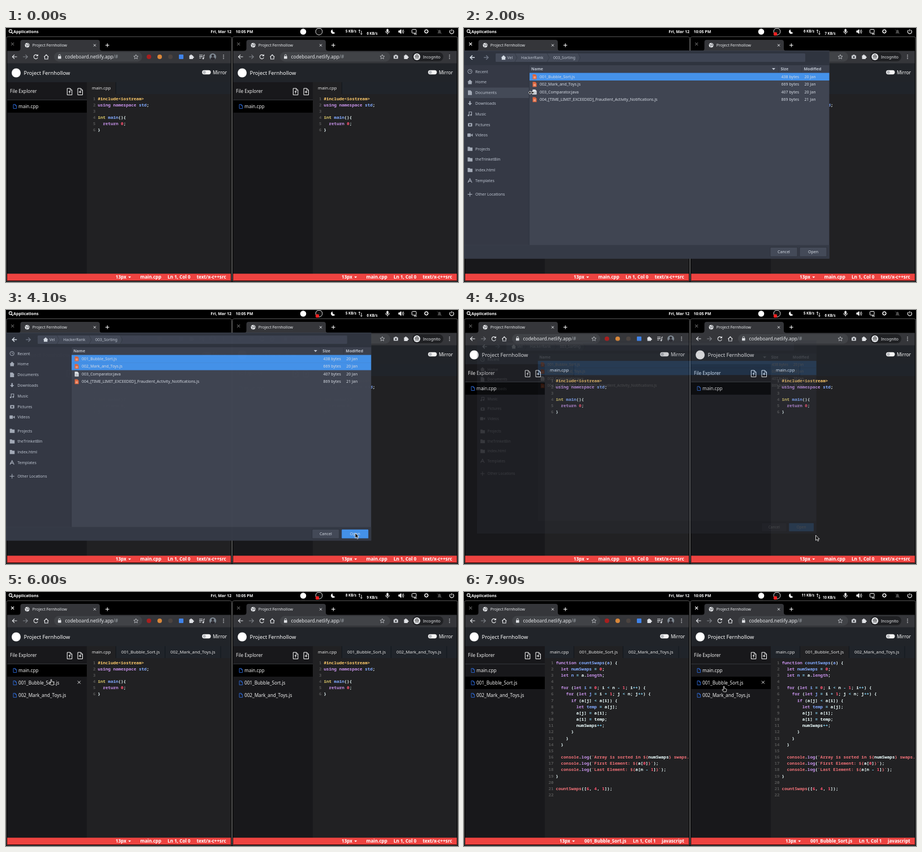
Recreate the animation shown at these times as an HTML page. Size 800x450 px, loop 8000 ms.

```html
<!DOCTYPE html>
<html lang="en">
<head>
<meta charset="utf-8">
<title>Shared code editor</title>
<style>
html, body { margin: 0; width: 100%; height: 100%; overflow: hidden; background: #000; }
svg { display: block; width: 100vw; height: 100vh; }
text { font-family: "Noto Sans", "Open Sans", sans-serif; white-space: pre; }
.b { font-weight: 700; }
.code text { font: 700 7.59px "Noto Sans Mono", "DejaVu Sans Mono", monospace; }
</style>
</head>
<body>
<svg id="stage" viewBox="0 0 800 450" preserveAspectRatio="none"></svg>
<script>
const LOOP = 8000;
const APP = "Project Fernhollow";
const FILES = ["main.cpp", "001_Bubble_Sort.js", "002_Mark_and_Toys.js"];
const BLUE = "#4592ea";

const esc = s => s.replace(/&/g, "&amp;").replace(/</g, "&lt;");
const T = (x, y, size, s, fill = "#fff", extra = "") =>
  `<text x="${x}" y="${y}" font-size="${size}" fill="${fill}" ${extra}>${esc(s)}</text>`;
const R = (x, y, w, h, fill, extra = "") =>
  `<rect x="${x}" y="${y}" width="${w}" height="${h}" fill="${fill}" ${extra}/>`;
const C = (x, y, r, fill, extra = "") => `<circle cx="${x}" cy="${y}" r="${r}" fill="${fill}" ${extra}/>`;
const L = (d, stroke = "#fff", w = 1, extra = "") =>
  `<path d="${d}" stroke="${stroke}" stroke-width="${w}" fill="none" ${extra}/>`;
const G = (id, body, extra = "") => `<g id="${id}" ${extra}>${body}</g>`;
const cross = (x, y, r) => `M${x - r} ${y - r}l${2 * r} ${2 * r}M${x + r} ${y - r}l${-2 * r} ${2 * r}`;
const BOLD = 'class="b"';

// Source code: ~ wraps a token, its first letter picks the colour.
const INK = { k: "#c792ea", d: "#82aaff", m: "#ffcb6b", t: "#decb6b", n: "#ff5370",
  v: "#f07178", s: "#f07178", p: "#c792ea", o: "#89ddff" };
const CPP = [
  "~m#include<iostream>~", "~kusing~ ~knamespace~ ~dstd~;", "",
  "~tint~ ~dmain~(){", "  ~kreturn~ ~n0~;", "}"
];
const JS = [
  "~kfunction~ ~dcountSwaps~(~da~) {",
  "  ~klet~ ~dnumSwaps~ ~o=~ ~n0~;",
  "  ~klet~ ~dn~ ~o=~ a.~plength~;",
  "",
  "  ~kfor~ (~klet~ ~di~ ~o=~ ~n0~; i ~o<~ n ~o-~ ~n1~; i~o++~) {",
  "    ~kfor~ (~klet~ ~dj~ ~o=~ i ~o+~ ~n1~; j ~o<~ n; j~o++~) {",
  "      ~kif~ (a[j] ~o<~ a[i]) {",
  "        ~klet~ ~dtemp~ ~o=~ a[j];",
  "        a[j] ~o=~ a[i];",
  "        a[i] ~o=~ temp;",
  "        numSwaps~o++~;",
  "      }", "    }", "  }", "",
  "  ~vconsole~.~plog~(~s`Array is sorted in ${~numSwaps~s} swaps.`~);",
  "  ~vconsole~.~plog~(~s`First Element: ${~a[~n0~]~s}`~);",
  "  ~vconsole~.~plog~(~s`Last Element: ${~a[n ~o-~ ~n1~]~s}`~);",
  "}", "",
  "~vcountSwaps~([~n6~, ~n4~, ~n1~]);", ""
];

function codeView(lines) {
  return lines.map((line, i) => {
    const y = 127.6 + i * 11.17;
    const spans = line.split("~").map((s, k) => k % 2
      ? `<tspan fill="${INK[s[0]]}">${esc(s.slice(1))}</tspan>` : esc(s)).join("");
    return `<text x="158.6" y="${y}" text-anchor="end" fill="#545454">${i + 1}</text>` +
      `<text x="162.4" y="${y}" fill="#eeffff">${spans}</text>`;
  }).join("");
}

const docIcon = (x, y) => L(`M${x} ${y}h5.5l3 3v8.5h-8.5z`) + L(`M${x + 5.3} ${y}v3.2h3.2`, "#fff", .8);
const fileIcon = y => L(`M13 ${y - 3.6}h3.4l2.2 2.2v5h-5.6z`, "#2f6fe0", .9) + L(`M16.2 ${y - 3.6}v2.4h2.4`, "#2f6fe0", .8);

const status = (x, file, col, mode) =>
  T(x[0], 444.4, 8.1, "13px", "#fff", BOLD) +
  `<path d="M${x[0] + 22.3} 440.2h5l-2.5 2.8z" fill="#fff"/>` +
  T(x[1], 444.4, 8.1, file, "#fff", BOLD) +
  T(x[2], 444.4, 8.1, "Ln 1, Col " + col, "#fff", BOLD) +
  T(x[3], 444.4, 8.1, mode, "#fff", BOLD);

const tab = (x, w, s, tx) =>
  T(tx, 109, 7.7, s, "#e6e6e6") + L(`M${x + w} 96v21`, "#11161c");

const puzzle = x =>
  R(x - 3.5, 48.5, 6.5, 6.5, "#dfe1e5", 'rx=".8"') + C(x - .4, 48.4, 1.5, "#dfe1e5") + C(x + 3.2, 51.8, 1.5, "#dfe1e5");
const dots = x => [-3, 0, 3].map(d => C(x, 51 + d, .85, "#dfe1e5")).join("");
const star = x => {
  let d = "";
  for (let i = 0; i < 10; i++) {
    const a = i * Math.PI / 5 - Math.PI / 2, r = i % 2 ? 1.9 : 4.2;
    d += (i ? "L" : "M") + (x + r * Math.cos(a)).toFixed(2) + " " + (51.3 + r * Math.sin(a)).toFixed(2);
  }
  return L(d + "z", "#c8cbd0", .8);
};

const leftTools = star(230) + C(253, 51, 4, "#a81e1e") + C(272, 51, 4, "#d9873a") +
  C(291, 51, 4, "#4b4340") + R(306, 47, 8, 8, "#3f83ea", 'rx="1"') + puzzle(328) +
  L("M342 48h6M342 50.6h6M342 53.2h3.5M350 48v5.5M350 48h2", "#dfe1e5", 1.1) + C(349, 54, 1.4, "#dfe1e5") +
  C(366, 51, 6, "#7d8791") + C(366, 49.3, 2.2, "#2b2a30") + `<path d="M362 55.5q0-4 4-4t4 4q-4 3-8 0" fill="#2b2a30"/>` +
  dots(385);
const rightTools = star(266) + R(286, 48.5, 8, 6, "#c9ccd1", 'rx="1"') + R(288.3, 47.3, 3.4, 2, "#c9ccd1") +
  C(290, 51.5, 1.5, "#35363a") + puzzle(308) + R(319, 43, 55, 16, "#202124", 'rx="8"') +
  C(327.3, 51, 6, "#e8eaed") + L("M323.5 50.2h7.6M325.3 49.6l.6-2h2.8l.6 2", "#333") +
  C(325.7, 52.8, 1.2, "none", 'stroke="#333" stroke-width=".7"') + C(329, 52.8, 1.2, "none", 'stroke="#333" stroke-width=".7"') +
  T(338, 53.5, 6.87, "Incognito", "#e8eaed") + dots(385);

function browser(id, ox, tools, pillEnd) {
  const chrome =
    R(.5, 15.5, 399, 434, "#000", 'rx="3" stroke="#555" stroke-width="1"') +
    `<path d="M2 63V40.5H21q4.5 0 4.5-4V25q0-4 4-4H162q4 0 4 4v11.5q0 4 4.5 4H398V63z" fill="#35363a"/>` +
    L(cross(11.6, 28.4, 2.5), "#fff", 1.2, `id="${id}x"`) +
    C(37.5, 30.5, 4, "#e8eaed") + L("M34.6 29l2.4 1.3v2l-1 1.3M38 27.2l1.7 1.5-1 1.8 2 1", "#35363a", .9) +
    T(46.8, 33, 7, APP, "#e8eaed") + L(cross(157, 30.6, 2), "#e8eaed") +
    L("M176 30.5h6.6M179.3 27.2v6.6", "#fff", 1.1) +
    L("M19.5 51h-8M15 47.3l-3.7 3.7 3.7 3.7", "#e8eaed", 1.1) +
    L("M30 51h8M34.5 47.3l3.7 3.7-3.7 3.7", "#80848a", 1.1) +
    L("M55.8 49a3.6 3.6 0 1 0 .4 3.2M56.3 46.8v2.7h-2.7", "#e8eaed", 1.1) +
    L("M67.3 51.3l4-4 4 4M68.5 50.3v4.7h5.6v-4.7", "#e8eaed", 1.1) +
    R(85, 42.5, pillEnd - 85, 17, "#414347", 'rx="8.5"') +
    R(92, 50, 5.6, 4.6, "#dfe1e5", 'rx=".6"') + L("M93.2 50v-1.4a1.6 1.6 0 0 1 3.2 0v1.4", "#dfe1e5", .9) +
    `<text x="104.4" y="54" font-size="8.36" fill="#e8eaed">codeboard.netlify.app<tspan fill="#9aa0a6">/#</tspan></text>` + tools;

  const page =
    R(2, 62.5, 396, 34, "#212429") + R(2, 96, 141, 340, "#18181b") + R(143, 96, 255, 21, "#20242a") +
    R(143, 117, 255, 319, "#212123") +
    C(18, 79.5, 8, "#fff") + T(31.5, 83, 9.35, APP) +
    R(347, 74.8, 15.5, 7.4, "#f4f4f4", 'rx="3.7"') + C(351, 78.5, 2.7, "#b9bcc0") + T(366, 81.5, 8.33, "Mirror") +
    T(7, 115, 8.2, "File Explorer", "#f0f0f0") +
    docIcon(108.3, 107) + L("M112.6 116v-4.3M110.7 113.3l1.9-1.9 1.9 1.9") +
    docIcon(127, 107) + L("M131.2 111v4.6M128.9 113.3h4.6") +
    L("M2 127.5h141", "#3b3f44", .8) +
    R(2, 128, 141, 22, "#000", `id="${id}row"`) +
    R(143, 96, 51.5, 21, "#212123", `id="${id}tab"`) +
    fileIcon(139) + T(22, 142, 8.2, FILES[0], "#f0f0f0") + tab(143, 51.5, FILES[0], 152) +
    G(id + "files",
      fileIcon(161) + T(22, 163.6, 8.2, FILES[1], "#f0f0f0") + fileIcon(183) + T(22, 185.6, 8.2, FILES[2], "#f0f0f0") +
      tab(195, 86.5, FILES[1], 204) + tab(282, 98, FILES[2], 291)) +
    L(cross(129.4, 160, 2.5), "#fff", .9, `id="${id}del"`) +
    G(id + "cpp", codeView(CPP), 'class="code"') + G(id + "js", codeView(JS), 'class="code" clip-path="url(#pane)"') +
    R(2, 435.3, 396, 12.3, "#ee4340") +
    G(id + "scpp", status([194, 237.5, 286, 337.5], FILES[0], 0, "text/x-c++src")) +
    G(id + "sjs", status([169, 213, 299, 350], FILES[1], 1, "javascript"));

  return `<g transform="translate(${ox} 0)">${chrome}${page}</g>`;
}

function topBar() {
  const rays = [0, 45, 90, 135].map(a => `<path d="M740 6h8" stroke="#fff" stroke-width="1.1" transform="rotate(${a} 744 6)"/>`).join("");
  return C(8, 5.5, 2.6, "none", 'stroke="#fff" stroke-width="1.1"') + L("M9.9 7.5l2.5 2.7", "#fff", 1.3) +
    T(13, 8.7, 7.2, "Applications", "#fff", BOLD) +
    T(362.3, 8.7, 7, "Fri, Mar 12", "#fff", BOLD) + T(406.5, 8.7, 7, "10:05 PM", "#fff", BOLD) +
    C(526, 6.5, 5.3, "#fff") + C(554, 6.3, 6, "#111", 'stroke="#ddd" stroke-width="1"') +
    R(548, 7.5, 6, 6, "#f02020", 'id="rec" rx="1.5"') +
    `<path d="M578 2.5a4 4 0 1 0 4.5 5.8a4.5 4.5 0 0 1-4.5-5.8z" fill="#fff"/>` +
    T(620, 8, 6.2, "", "#fff", 'id="up" class="b" text-anchor="end"') +
    T(657.5, 11.8, 6.2, "", "#fff", 'id="down" class="b" text-anchor="end"') +
    L("M625.5 9V3M624 4.8l1.5-1.8 1.5 1.8M629 5v6.5M627.5 9.7l1.5 1.8 1.5-1.8", "#fff", .9) +
    R(673.5, 1.5, 3.4, 6, "#fff", 'rx="1.7"') + L("M671.8 5.5q0 3.5 3.4 3.5t3.4-3.5M675.2 9v2.3") +
    `<path d="M694.5 4.5h2l3-2.7v9l-3-2.7h-2z" fill="#fff"/>` + L("M701 4q1.5 2.3 0 4.6M702.7 2.5q2.7 3.8 0 7.6") +
    R(718.5, 2.5, 7.5, 6.5, "none", 'stroke="#fff" rx="1"') + L("M722 10.7h5", "#fff", 1.2) +
    rays + C(744, 6, 2.7, "#000", 'stroke="#fff" stroke-width="1.1"') +
    `<path d="M763.5 9.5q1.5-1.5 1.5-4a2.2 2.2 0 0 1 4.4 0q0 2.5 1.5 4z" fill="#4c4c4c"/>` + L("M763 2.5l8 8", "#4c4c4c", .8) +
    L("M786.7 3.7a3.6 3.6 0 1 0 4.4 0M788.9 2v4", "#fff", 1.1);
}

function dialog() {
  const ink = "#bcc3cf", dim = "#a4abb8";
  const places = ["Recent", "Home", "Documents", "Downloads", "Music", "Pictures", "Videos",
    "Projects", "theTrinketBin", "index.html", "Templates", "Other Locations"];
  const placeY = i => 77 + i * 18.8 + (i > 6 ? 5.4 : 0) + (i > 10 ? 5.4 : 0);
  const folder = y => `<path d="M6.5 ${y - 3.5}h3.5l1 1.2h4v6h-8.5z" fill="${dim}"/>`;
  const icon = (i, y) => [
    C(10.5, y, 3.7, "none", `stroke="${dim}"`) + L(`M10.5 ${y - 2.2}v2.4h2`, dim, .8),
    `<path d="M6 ${y}l4.5-4.3 4.5 4.3h-1.3v3.7h-6.4v-3.7z" fill="${dim}"/>`,
    `<path d="M7 ${y - 4}h4.5l2.5 2.5v5.7h-7z" fill="${dim}"/>`,
    `<path d="M9.3 ${y - 4}h2.4v3.5h2.5l-3.7 4-3.7-4h2.5z" fill="${dim}"/>`,
    L(`M9 ${y + 2.5}v-6h4.5v5`, dim, 1.1) + C(8, y + 2.6, 1.5, dim) + C(12.5, y + 1.8, 1.5, dim),
    R(7, y - 2.5, 7.5, 6, dim, 'rx="1"') + C(10.7, y + .5, 1.6, "#353945"),
    R(6, y - 3, 6, 6, dim, 'rx="1"') + `<path d="M12 ${y}l3.3-2.7v5.4z" fill="${dim}"/>`,
    folder(y), folder(y), folder(y),
    L(`M7 ${y + 3.5}l3.5-7 3.5 7M7 ${y + 1}h5`, dim, 1.2),
    L(`M6.5 ${y}h8M10.5 ${y - 4}v8`, dim, 1.1)
  ][i];
  const rows = [[FILES[1], 438, 20], [FILES[2], 669, 20], ["003_Comparator.java", 407, 20],
    ["004_[TIME_LIMIT_EXCEEDED]_Fraudlent_Activity_Notifications.js", 869, 21]];
  const list = rows.map(([name, size, day], i) => {
    const y = 86.3 + i * 13.5, java = name.endsWith("java");
    return `<path d="M121.5 ${y - 4.2}h4.7l2.3 2.3v6.3h-7z" fill="${java ? "#dfe3e8" : "#e0673f"}"/>` +
      L(`M123 ${y + .3}h4M123 ${y + 2.2}h4`, java ? "#8b929c" : "#fbdccd", .8) +
      T(134, y + 2.5, 7, name, "#d5dbe4") +
      T(593, y + 2.5, 7, size + " bytes", "#d5dbe4", 'text-anchor="end"') + T(602.5, y + 2.5, 7, day + " Jan", "#d5dbe4");
  }).join("");
  const button = (x, s, id) =>
    R(x, 388.5, 48, 16.5, "#444a58", `id="${id}" rx="1.5" stroke="#2b2e39" stroke-width=".7"`) +
    T(x + 24, 399.3, 7, s, "#d3dae3", 'text-anchor="middle"');
  return R(0, 40, 646.5, 368.5, "#404552") + R(0, 40, 646.5, 26, "#2f343f") +
    L("M0 40.3h646.5", "#454b58", .6) +
    L("M19 52.3h-8M14.8 48.6l-3.8 3.7 3.8 3.7", "#d3dae3", 1.5) + L("M35 52.3h8M39.2 48.6l3.8 3.7-3.8 3.7", "#6b7280", 1.5) +
    R(56, 45, 548, 15, "#3e4453", 'rx="1.5"') + R(56, 45, 148, 15, "#444a58", 'rx="1.5"') +
    L("M90 45l4 7.5-4 7.5M147 45l4 7.5-4 7.5M202 45l4 7.5-4 7.5", "#343a46", .9) +
    `<path d="M65.5 52.5l4.5-4.2 4.5 4.2h-1.3v3.7h-6.4v-3.7z" fill="#d3dae3"/>` +
    T(76.5, 55, 7, "Vel", ink) + T(101, 55, 7, "HackerRank", ink) + T(158, 55, 7, "003_Sorting", ink) +
    R(0, 66, 115, 318.5, "#353945") + R(0, 105.5, 115, 18.5, "#444a57", 'id="docs"') +
    places.map((s, i) => icon(i, placeY(i)) + T(20, placeY(i) + 2.5, 7, s, ink)).join("") +
    L("M115.4 66v318.5", "#2d313b", .8) +
    R(116, 66, 530.5, 13.3, "#3c414e") + L("M116 79.3h530.5", "#333844", .6) +
    L("M556.5 67v12M597.5 67v12", "#343945", .7) +
    T(119, 75.2, 7, "Name", ink, BOLD) + T(560.5, 75.2, 7, "Size", ink, BOLD) + T(601.5, 75.2, 7, "Modified", ink, BOLD) +
    `<path d="M545 71h6l-3 3.5z" fill="${ink}"/>` +
    R(116, 79.5, 530.5, 13.5, BLUE) + R(116, 93, 530.5, 13.5, BLUE, 'id="sel2"') + list +
    R(0, 384.5, 646.5, 24, "#353a46") + button(542, "Cancel", "cancel") + button(594, "Open", "open");
}

const pointerShape = (id, d) => G(id, `<path d="${d}" fill="#111" stroke="#fff" stroke-width=".8"/>`);
const cursors =
  pointerShape("arrow", "M0 0V9.2L2.2 7.3 3.7 10.5 5.3 9.8 3.9 6.7H6.6Z") +
  pointerShape("hand", "M-.8 .3q.8-.8 1.6 0v3.4l3 .7q1.2.4 1 1.7l-.8 3.7h-4.4l-2.6-3.3q0-1 1-.8l1.2.8z") +
  pointerShape("resize", "M-5 0l3.2-3v2h3.6v-2l3.2 3-3.2 3v-2h-3.6v2z");

document.getElementById("stage").innerHTML =
  `<defs><clipPath id="pane"><rect x="143" y="117" width="255" height="319"/></clipPath></defs>` +
  R(0, 0, 800, 450, "#000") + topBar() + browser("l", 0, leftTools, 241) + browser("r", 400, rightTools, 280) +
  G("dialog", dialog()) + G("cursor", cursors);

const el = {};
document.querySelectorAll("[id]").forEach(n => el[n.id] = n);
const show = (id, on) => el[id].setAttribute("display", on ? "inline" : "none");
const within = (t, a, b) => t >= a && t < b;

// Pointer stops: time, x, y
const PATH = [[300, 792, 454], [1500, 113, 111], [1900, 113, 111], [2000, 119, 114.5], [2300, 119, 114.5],
  [2850, 180, 100], [3050, 180, 100], [3400, 394, 188], [3850, 618, 395], [4100, 618, 395], [4200, 622.5, 399],
  [4400, 622.5, 399], [5900, 80, 155], [6900, 80, 155], [7700, 460, 167], [LOOP, 460, 167]];
function pointer(t) {
  const i = PATH.findIndex(p => t < p[0]);
  if (i <= 0) return PATH[0].slice(1);
  const [t0, x0, y0] = PATH[i - 1], [t1, x1, y1] = PATH[i];
  const p = (t - t0) / (t1 - t0), e = p * p * (3 - 2 * p);
  return [x0 + (x1 - x0) * e, y0 + (y1 - y0) * e];
}

// Network rates: start time, up, down
const RATES = [[0, 5, 6], [500, 6, 7], [3700, 5, 6], [5600, 8, 9], [7300, 11, 10]];

function updateWindow(id, ox, focus, files, js, x, y) {
  el[id + "x"].setAttribute("stroke", focus ? "#fff" : "#5c5c5c");
  show(id + "files", files);
  show(id + "cpp", !js);
  show(id + "scpp", !js);
  show(id + "js", js);
  show(id + "sjs", js);
  el[id + "row"].setAttribute("y", js ? 150 : 128);
  el[id + "tab"].setAttribute("x", js ? 195 : 143);
  el[id + "tab"].setAttribute("width", js ? 86.5 : 51.5);
  const onList = files && within(x - ox, 2, 143) && within(y, 128, 194);
  show(id + "del", onList && within(y, 150, 172));
  return onList;
}

function render(t) {
  const [x, y] = pointer(t);
  const rate = RATES.filter(r => t >= r[0]).pop();
  el.up.textContent = rate[1] + " KB/s";
  el.down.textContent = rate[2] + " KB/s";
  show("rec", t >= 100);

  const overLeft = updateWindow("l", 0, within(t, 1500, 2100) || within(t, 4300, 7800), t >= 4400, t >= 6300, x, y);
  const overRight = updateWindow("r", 400, t >= 7800, t >= 4600, t >= 7900, x, y);

  const fade = Math.min(1, Math.max(0, (t - 4100) / 128)), k = 1 - .09 * fade;
  const open = t >= 2000 && fade < 1;
  show("dialog", open);
  el.dialog.setAttribute("opacity", 1 - fade);
  el.dialog.setAttribute("transform", `translate(324 229) scale(${k}) translate(-324 -229)`);
  show("sel2", t >= 2900);
  show("docs", open && x < 121);
  el.open.setAttribute("fill", within(x, 594, 642) && y > 388 ? BLUE : "#444a58");

  const resize = open && x < 121, hand = overLeft || overRight;
  show("cursor", t >= 300);
  show("resize", resize);
  show("hand", hand && !resize);
  show("arrow", !hand && !resize);
  el.cursor.setAttribute("transform", `translate(${x} ${y})`);
}

const start = performance.now();
function tick() {
  render((performance.now() - start) % LOOP);
  requestAnimationFrame(tick);
}
tick();
</script>
</body>
</html>
```
